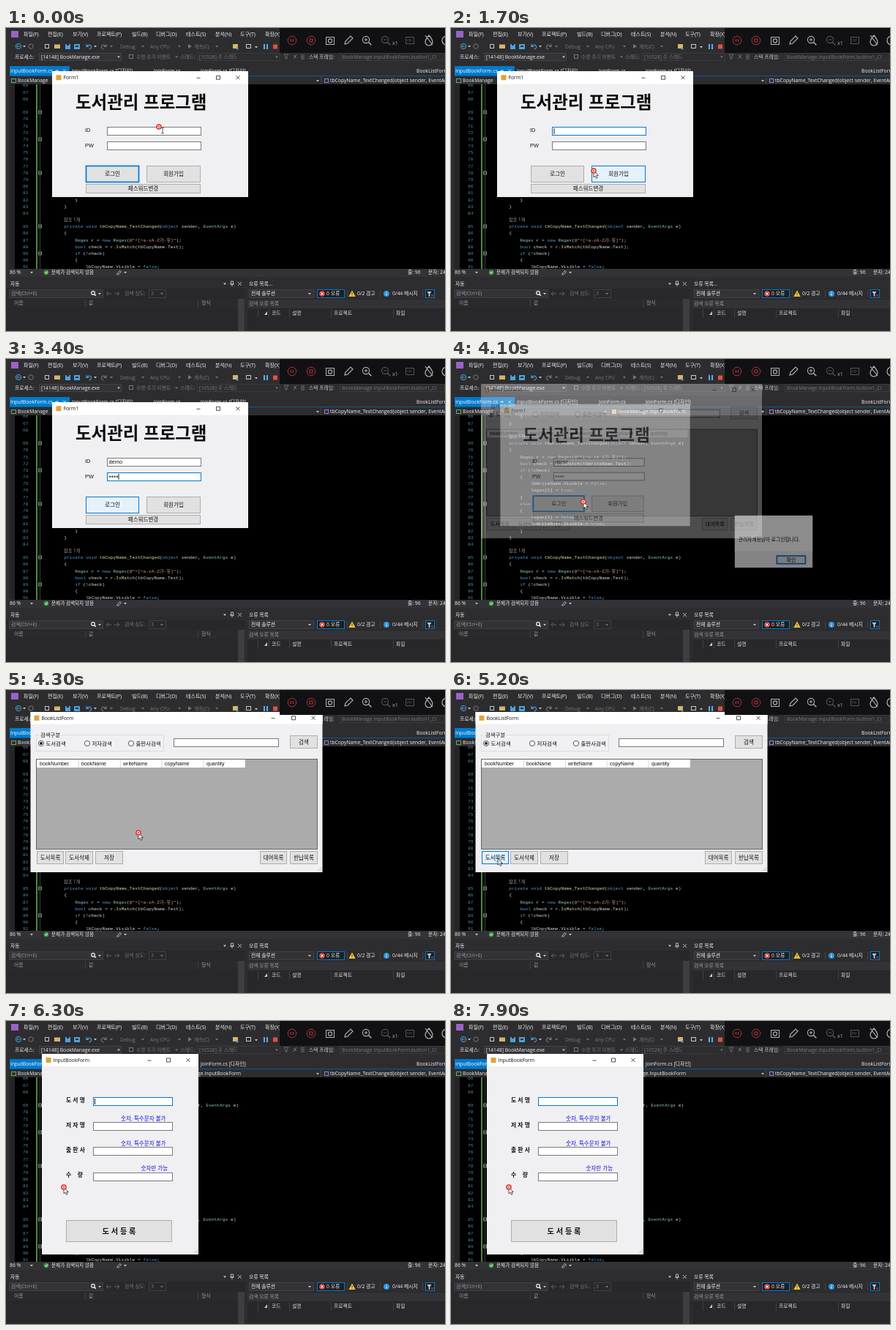
Animation of 600 by 414 pixels, one loop 8000 ms. Source, as an HTML page:

```html
<!DOCTYPE html>
<html lang="ko">
<head>
<meta charset="utf-8">
<title>도서관리 프로그램</title>
<style>
html, body { margin: 0; width: 100%; height: 100%; overflow: hidden; background: #2d2d30; }
svg { display: block; width: 100%; height: 100%; }
text { font-family: "Open Sans", "Noto Sans CJK KR", "Noto Sans CJK", sans-serif; white-space: pre; }
.form text { font-family: "Liberation Sans", "Noto Sans CJK KR", "Noto Sans CJK", sans-serif; }
text.code { font-family: "Liberation Mono", "Noto Sans CJK KR", "Noto Sans CJK", monospace; }
</style>
</head>
<body>
<svg id="stage" viewBox="0 0 600 414"></svg>
<script>
const LOOP = 8000, TICK = 100;
const stage = document.getElementById('stage');

function add(parent, tag, attrs = {}) {
  const node = document.createElementNS('http://www.w3.org/2000/svg', tag);
  set(node, attrs);
  parent.appendChild(node);
  return node;
}
function set(node, attrs) {
  for (const k in attrs) node.setAttribute(k, attrs[k]);
}
// Edges are given as left, top, right, bottom.
function box(p, x, y, r, b, fill, stroke) {
  const o = stroke ? .5 : 0;
  return add(p, 'rect', { x: x + o, y: y + o, width: r - x - 2 * o, height: b - y - 2 * o,
    fill, stroke: stroke || 'none' });
}
// y is the vertical middle of the text.
function label(p, x, y, str, fill = '#f1f1f1', size = 6.8, extra = {}) {
  const t = add(p, 'text', { x, y: y + size * .36, fill, 'font-size': size, ...extra });
  t.textContent = str;
  return t;
}
const line = (p, d, stroke, w = 1, fill = 'none') =>
  add(p, 'path', { d, stroke, 'stroke-width': w, fill });
const dot = (p, cx, cy, r, fill, stroke = 'none', w = 1) =>
  add(p, 'circle', { cx, cy, r, fill, stroke, 'stroke-width': w });
const drop = (p, x, y, c = '#c8c8c8') =>
  add(p, 'path', { d: `M${x - 2} ${y - 1}h4l-2 2.4z`, fill: c });
const lens = (p, x, y, r, c, w = 1) => {
  dot(p, x, y, r, 'none', c, w);
  line(p, `M${x + r * .7} ${y + r * .7}l${r * .9} ${r * .9}`, c, w * 1.3);
};

/* ---------- editor ---------- */
const DIM = '#77777b', GREY = '#c8c8c8', BAR = '#2d2d30';

function menuAndTools(p) {
  box(p, 0, 0, 600, 67, BAR);
  box(p, 7, 4, 17, 13, '#9a63c8');
  [['파일(F)', 24], ['편집(E)', 57], ['보기(V)', 91], ['프로젝트(P)', 124], ['빌드(B)', 172],
   ['디버그(D)', 205], ['테스트(S)', 246], ['분석(N)', 286], ['도구(T)', 320], ['확장(X)', 354]]
    .forEach(([s, x]) => label(p, x, 8.9, s, '#f1f1f1', 7));

  dot(p, 17, 25, 3.6, 'none', '#4aa3e0');
  line(p, 'M19 25h-4m1.6 -1.6l-1.6 1.6l1.6 1.6', '#4aa3e0', .9);
  drop(p, 25, 25);
  dot(p, 34, 25, 3.2, 'none', DIM);
  box(p, 53, 22, 59, 28, 'none', GREY);
  box(p, 66, 22.5, 74, 28, '#d8b46a');
  box(p, 81, 22, 88, 29, '#4aa3e0');
  box(p, 83, 22, 86, 24, BAR);
  box(p, 93, 22, 101, 29, '#4aa3e0');
  box(p, 95, 24, 99, 26, BAR);
  line(p, 'M110 22v3.4h3.4M110.4 25q4 -4 6 0q1 3 -3 4', '#4aa3e0', 1.1);
  drop(p, 122, 25);
  line(p, 'M137 22v3.4h-3.4M136.6 25q-4 -4 -6 0q-1 3 3 4', DIM, 1.1);
  drop(p, 144, 25, DIM);
  label(p, 156, 25.4, 'Debug', DIM);
  drop(p, 187, 25, DIM);
  label(p, 197, 25.4, 'Any CPU', DIM);
  drop(p, 237, 25, DIM);
  add(p, 'path', { d: 'M249 22l5 3l-5 3z', fill: DIM });
  label(p, 257, 25.4, '계속(C)', DIM);
  drop(p, 288, 25, DIM);
  box(p, 310, 22, 317, 28, '#d8b46a');
  dot(p, 316, 28, 1.6, '#4aa3e0');
  box(p, 328, 22, 335, 28, 'none', GREY);
  drop(p, 342, 26);
  box(p, 352, 22, 354, 29, '#5ab0ee');
  box(p, 356, 22, 358, 29, '#5ab0ee');
  box(p, 365, 22.5, 371, 28.5, '#e0523e');

  label(p, 12, 39.5, '프로세스:');
  box(p, 45, 34, 158, 45, '#333337', '#434346');
  label(p, 48, 39.5, '[14148] BookManage.exe');
  drop(p, 154, 39.5);
  box(p, 168, 36, 174, 42, 'none', DIM);
  label(p, 178, 39.5, '수명 주기 이벤트', DIM);
  drop(p, 233, 39.5, DIM);
  label(p, 238, 39.5, '스레드:', DIM);
  box(p, 261, 34, 375, 45, 'none', '#3a3a3e');
  label(p, 264, 39.5, '[10528] 주 스레드', DIM);
  drop(p, 370, 39.5, DIM);
  line(p, 'M380 36h6l-2 3v3h-2v-3z', DIM, .8);
  line(p, 'M393 42l4 -6M393 37l4 4', DIM, 1);
  line(p, 'M403 37h5m-5 2.5h5m-5 2.5h5', DIM, 1);
  label(p, 414, 39.5, '스택 프레임:', GREY);
  box(p, 456, 34, 600, 45, 'none', '#3a3a3e');
  label(p, 459, 39.5, 'BookManage.InputBookForm.button1_Cl', DIM);

  box(p, 5, 52, 87, 65, '#007acc');
  label(p, 6, 58.6, 'InputBookForm.cs', '#fff');
  line(p, 'M67 58.6h5m-2 -2v4M78 56.6l4 4m0 -4l-4 4', '#d0e6f5', .9);
  label(p, 90, 58.6, 'InputBookForm.cs [디자인]');
  label(p, 202, 58.6, 'JoinForm.cs');
  label(p, 266, 58.6, 'JoinForm.cs [디자인]');
  label(p, 561, 58.6, 'BookListForm.cs');
  box(p, 5, 65, 600, 66, '#0a588e');
}

function recorder(p) {
  box(p, 374, 0, 600, 34, '#111114');
  const red = '#b8383c', ink = '#b4b4b8', off = '#55555a';
  for (const x of [391, 417]) dot(p, x, 17, 5.8, 'none', red, .9);
  line(p, 'M389.5 15v4M392.5 15v4', red, 1.1);
  box(p, 414.5, 14.5, 419.5, 19.5, 'none', red);
  box(p, 437, 12, 449, 23, 'none', ink);
  dot(p, 443, 17.5, 2.6, 'none', ink, 1.1);
  line(p, 'M463 22l1 -4l7 -7l3 3l-7 7z', ink, 1.1);
  for (const [x, c] of [[492, ink], [518, off]]) {
    lens(p, x, 16, 4.6, c, 1.1);
    line(p, `M${x - 2.2} 16h4.4`, c);
  }
  line(p, 'M492 13.8v4.4', ink);
  label(p, 528, 20.5, 'x1', ink, 7);
  box(p, 546, 12, 558, 22, 'none', off);
  label(p, 548, 17, 'PIP', off, 4.6);
  line(p, 'M578 10q5 6 5 9a5 5 0 0 1 -10 0q0 -3 5 -9zM573 10l10 13', ink, 1.2);
  dot(p, 602, 17, 6, 'none', ink, 1.2);
}

const COLORS = [
  [/^(private|void|object|new|bool|if|else|true|false)$/, '#569cd6'],
  [/^(Regex|EventArgs)$/, '#8cc8bc'],
  [/^@?"/, '#d69d85'],
  [/_TextChanged$|^IsMatch$/, '#dcdcaa']
];
// Each method has an extra row above it for its reference count.
const ROW = 9.18, METHODS = [69, 85], CODE_SIZE = 6.22;
const rowY = n => 271 + (n - 85 - METHODS.filter(m => n < m).length) * ROW;

function codeLine(p, n, col, str) {
  const t = label(p, 49.4 + col * 3.73, rowY(n), '', '#dcdcdc', CODE_SIZE, { class: 'code' });
  for (const part of str.match(/@?"[^"]*"|\w+|\s+|[^\w\s"]/g)) {
    const hit = COLORS.find(([re]) => re.test(part));
    const s = add(t, 'tspan', hit ? { fill: hit[1] } : {});
    s.textContent = part;
  }
}

function codeBlock(p, n, name) {
  label(p, 79, rowY(n) - ROW, '참조 1개', '#a0a0a0', 6.2);
  [[8, `private void tb${name}_TextChanged(object sender, EventArgs e)`], [8, '{'],
   [12, 'Regex r = new Regex(@"^[^a-zA-Z가-힣]");'],
   [12, `bool check = r.IsMatch(tb${name}.Text);`], [12, 'if (!check)'], [12, '{'],
   [16, `lb${name}.Visible = false;`], [16, 'login[1] = true;'], [12, '}'], [12, 'else'], [12, '{'],
   [16, 'login[1] = false;'], [16, `lb${name}.Visible = true;`], [12, '}'], [8, '}']]
    .slice(0, 92 - n).forEach(([col, s], i) => codeLine(p, n + i, col, s));
}

function editor(p) {
  box(p, 5, 66, 600, 77, BAR);
  box(p, 7, 69, 14, 75, 'none', '#69a869');
  label(p, 16, 72, 'BookManage');
  line(p, 'M215.5 67v10M430.5 67v10', '#434346');
  drop(p, 211, 72); drop(p, 426, 72);
  box(p, 220, 69, 226, 75, '#d8a868');
  label(p, 228, 72, 'BookManage.InputBookForm');
  box(p, 435, 69, 441, 75, 'none', '#9b7fd0');
  label(p, 443, 72, 'tbCopyName_TextChanged(object sender, EventArgs e)');

  box(p, 5, 77, 600, 329, '#000');
  box(p, 5, 77, 12, 329, '#252528');
  box(p, 41, 77, 43, 329, '#4f8a3a');
  line(p, 'M46.5 77V329', '#5a5a5a', .7);
  for (const n of [69, 73, 78, 85, 89]) {
    const y = Math.round(rowY(n));
    box(p, 44, y - 2.5, 49, y + 2.5, '#000', '#8a8a8a');
    line(p, `M45.4 ${y}h2.2`, '#c0c0c0', .8);
  }
  for (let n = 66; n < 92; n++)
    label(p, 23, rowY(n), n, '#4a8ea6', CODE_SIZE, { class: 'code' });
  codeLine(p, 66, 12, '}');
  codeLine(p, 67, 8, '}');
  codeBlock(p, METHODS[0], 'WriteName');
  codeBlock(p, METHODS[1], 'CopyName');

  box(p, 0, 329, 600, 414, BAR);
  box(p, 5, 329, 600, 340, '#333337');
  label(p, 5, 334, '86 %');
  drop(p, 35, 334);
  dot(p, 55, 334, 3.2, '#3fa04a');
  line(p, 'M53.4 334l1.3 1.4l2.2 -2.8', '#fff', .9);
  label(p, 62, 334, '문제가 검색되지 않음', '#f1f1f1', 6.6);
  line(p, 'M151.5 336.5l4 -5l2 1.6l-4 4z', GREY, .9);
  drop(p, 163, 334);
  label(p, 549, 334, '줄: 96');
  label(p, 577, 334, '문자: 24');
}

let errorTitle;
function panels(p) {
  const back = '#28272a';
  box(p, 0, 343, 327, 414, back);
  box(p, 0, 343, 327, 356, BAR);
  label(p, 6, 349.5, '자동');
  drop(p, 299, 349.5);
  line(p, 'M307.5 346h3v4h-3zM306 350h6M309 350v3M317 347l5 5m0 -5l-5 5', GREY, .9);
  box(p, 4, 357, 133, 369, '#333337', '#3f3f46');
  label(p, 7, 363, '검색(Ctrl+E)', '#9a9a9a');
  lens(p, 119, 362, 2.3, '#f1f1f1', 1.2);
  drop(p, 128, 363);
  line(p, 'M144 363h-7m3 -3l-3 3l3 3M148 363h7m-3 -3l3 3l-3 3', '#606064', 1);
  label(p, 162, 363, '검색 심도:', DIM);
  box(p, 195, 357, 219, 369, 'none', '#3f3f46');
  label(p, 198, 363, '3', DIM);
  drop(p, 213, 363, DIM);
  box(p, 0, 370, 327, 382, '#2a2a2c');
  box(p, 317, 370, 326, 414, '#3e3e42');
  [['이름', 11], ['값', 113], ['형식', 267]].forEach(([s, x]) => label(p, x, 376, s, '#9a9a9a'));
  line(p, 'M108.5 371v10M262.5 371v10', '#3f3f46');

  box(p, 330, 343, 600, 414, back);
  box(p, 330, 343, 600, 370, BAR);
  errorTitle = label(p, 332, 349.5, '오류 목록...');
  box(p, 332, 357, 421, 369, '#333337', '#434346');
  label(p, 335, 363, '전체 솔루션');
  drop(p, 415, 363);
  box(p, 425, 357, 463, 369, '#1f1f22', '#007acc');
  dot(p, 432, 363, 3.8, '#e04a3f');
  line(p, 'M430.4 361.4l3.2 3.2m0 -3.2l-3.2 3.2', '#fff', 1);
  label(p, 438, 363, '0 오류');
  add(p, 'path', { d: 'M473 358.5l4.6 8.5h-9.2z', fill: '#f5c93a' });
  line(p, 'M473 361.5v2.6m0 .8v1', '#222', .9);
  label(p, 480, 363, '0/2 경고');
  line(p, 'M466.5 358v10M511.5 358v10M569.5 358v10', '#434346');
  dot(p, 520, 363, 4, '#2a97dc');
  line(p, 'M520 360.5v1m0 1v3', '#fff', 1);
  label(p, 528, 363, '0/44 메시지');
  box(p, 573, 357, 586, 369, '#1f1f22', '#007acc');
  line(p, 'M576 360.5h5l-2 2.5v3.5h-1v-3.5z', GREY, .8, GREY);
  line(p, 'M581 364l3 3m0 -3l-3 3', '#e04a3f', .9);
  box(p, 330, 371, 600, 383, '#333337');
  label(p, 332, 377, '검색 오류 목록', '#9a9a9a');
  [['코드', 363], ['설명', 391], ['프로젝트', 448], ['파일', 533]]
    .forEach(([s, x]) => label(p, x, 390, s, '#e0e0e0'));
  line(p, 'M344.5 384v12M359.5 384v12M387.5 384v12M444.5 384v12M529.5 384v12', '#3f3f46');
  add(p, 'path', { d: 'M353 392l4 -5v5z', fill: GREY });
}

/* ---------- forms ---------- */
const BLUE = '#0078d7', FACE = '#f0eff2';

function makeForm(x, y, r, b, barH, title, icon, controls) {
  const g = add(stage, 'g', { class: 'form' });
  box(g, x, y, r, b, FACE);
  box(g, x, y, r, y + barH, '#fff');
  const mid = y + barH / 2;
  if (icon) {
    const [mn, mx, cl] = controls;
    box(g, icon, mid - 3.5, icon + 7, mid + 3.5, '#e0a23c');
    label(g, icon + 10, mid, title, '#111', 6.8, { style: 'font-family:"Open Sans",sans-serif' });
    line(g, `M${mn - 2.5} ${mid + .5}h5`, '#222', .8);
    line(g, `M${mx - 2.5} ${mid - 2.5}h5v5h-5z`, '#222', .8);
    line(g, `M${cl - 2.5} ${mid - 2.5}l5 5m0 -5l-5 5`, '#222', .8);
  }
  const cx = (x + r) / 2, cy = (y + b) / 2;
  return {
    g,
    show(a) {
      const s = 1 - .055 * (1 - a);
      set(g, { opacity: a, visibility: a ? 'visible' : 'hidden',
        transform: `translate(${cx} ${cy}) scale(${s}) translate(${-cx} ${-cy})` });
    }
  };
}

const LOOKS = {
  plain: { fill: '#e1e1e1', stroke: '#adadad', 'stroke-width': 1 },
  focus: { fill: '#e1e1e1', stroke: BLUE, 'stroke-width': 1.7 },
  hover: { fill: '#e5f1fb', stroke: BLUE, 'stroke-width': 1 },
  down: { fill: '#cce4f7', stroke: '#005499', 'stroke-width': 1 }
};
function button(g, x, y, r, b, str, size = 7.5, extra = {}) {
  const face = box(g, x, y, r, b, '#e1e1e1', '#adadad');
  label(g, (x + r) / 2, (y + b) / 2, str, '#111', size, { 'text-anchor': 'middle', ...extra });
  return look => set(face, LOOKS[look]);
}
function field(g, x, y, r, b) {
  const frame = box(g, x, y, r, b, '#fff', '#7a7a7a');
  return on => set(frame, { stroke: on ? BLUE : '#7a7a7a' });
}
const caretLine = g => line(g, '', '#000', .9);
const placeCaret = (c, x, y, on) => set(c, { d: on ? `M${x} ${y - 4}v8` : 'M0 0' });
function grip(g, x, y) {
  for (const [i, j] of [[0, 0], [2, 0], [2, -2], [4, 0], [4, -2], [4, -4]])
    box(g, x + i - 6, y + j - 3, x + i - 5, y + j - 2, '#b0b0b0');
}

menuAndTools(stage);
editor(stage);
panels(stage);

const list = makeForm(33.5, 30, 432.5, 249, 16.5, 'BookListForm', 38.5, [365, 393, 420]);
box(list.g, 41, 61, 216, 84, 'none', '#dcdcdc');
box(list.g, 45, 58, 76, 65, FACE);
label(list.g, 47, 61.5, '검색구분', '#111', 7.4);
[['도서검색', 48], ['저자검색', 111], ['출판사검색', 171]].forEach(([s, x], i) => {
  dot(list.g, x, 73, 3.6, '#fff', '#444', .9);
  if (!i) dot(list.g, x, 73, 2, '#222');
  label(list.g, x + 6.5, 73, s, '#111', 7.4);
});
field(list.g, 229, 66, 373, 78);
button(list.g, 388, 62, 426, 80, '검색');
box(list.g, 41, 94, 426, 218, '#ababab', '#646464');
box(list.g, 42, 95, 327, 106, '#fff');
['bookNumber', 'bookName', 'writeName', 'copyName', 'quantity'].forEach((s, i) => {
  label(list.g, 46 + i * 57, 100.5, s, '#111', 7);
  line(list.g, `M${99.5 + i * 56.8} 95v11`, '#d8d8d8');
});
const bookButton = button(list.g, 42, 220, 79, 238, '도서목록');
button(list.g, 81, 220, 119, 238, '도서삭제');
button(list.g, 122, 220, 160, 238, '저장');
button(list.g, 347, 220, 384, 238, '대여목록');
button(list.g, 388, 220, 426, 238, '반납목록');
grip(list.g, 432, 249);

const login = makeForm(63, 59, 331, 231, 17.5, 'Form1', 68.5, [263, 290, 317]);
label(login.g, 95, 102, '도서관리 프로그램', '#0a0a0a', 23.5, { 'font-weight': 700 });
label(login.g, 108, 139.5, 'ID', '#111', 7.4);
label(login.g, 108, 160.5, 'PW', '#111', 7.4);
const idField = field(login.g, 138, 135, 267, 147);
const pwField = field(login.g, 138, 155, 267, 167);
const idText = label(login.g, 140.5, 140.2, '', '#111', 7.4);
const pwText = label(login.g, 140.5, 162, '', '#111', 8.4);
const loginCaret = caretLine(login.g);
const loginButton = button(login.g, 109, 188, 182, 211, '로그인');
const joinButton = button(login.g, 192, 188, 266, 211, '회원가입');
button(login.g, 109, 213, 266, 226, '패스워드변경');

const message = makeForm(386.5, 213, 495.5, 286, 50, '', 0);
label(message.g, 391.5, 246, '관리자계정님이 로그인합니다.', '#111', 6.9);
button(message.g, 445, 269, 486, 281, '확인', 7)('focus');

const input = makeForm(49, 45, 263, 319, 17, 'InputBookForm', 54.5, [196, 222, 249]);
['도 서 명', '저 자 명', '출 판 사', '수    량'].forEach((s, i) => {
  const y = 104 + i * 34.2;
  label(input.g, 82, y + 4, s, '#111', 7.8, { 'font-weight': 700 });
  field(input.g, 119, Math.round(y), 228, Math.round(y) + 12)(!i);
  if (i) label(input.g, i < 3 ? 157 : 184.5, y - 5, i < 3 ? '숫자, 특수문자 불가' : '숫자만 가능', '#1010e0', 7.5);
});
const inputCaret = caretLine(input.g);
button(input.g, 82, 272, 227, 302, '도 서 등 록', 10.2, { 'font-weight': 700 });
grip(input.g, 263, 319);

recorder(stage);

/* ---------- pointer ---------- */
const pointer = add(stage, 'g');
const arrow = line(pointer, 'M0 0v9l2 -1.8l1.5 3.1l1.6 -.8l-1.4 -2.9h2.6z', '#111', .7, '#fff');
const beam = line(pointer, 'M-2 -4h1.5l.5 .5l.5 -.5h1.5M0 -3.5v7M-2 4h1.5l.5 -.5l.5 .5h1.5', '#222', .8);
const mark = add(pointer, 'g');
dot(mark, 0, 0, 3.1, '#fbd9d6', '#e0322c', 1.5);
line(mark, 'M-1.2 -1.2l2.4 2.4m0 -2.4l-2.4 2.4', '#e0322c', .8);
const busy = dot(pointer, 0, 0, 4.4, 'none', '#3aa0e8', 2);

/* ---------- timeline ---------- */
function track(keys, t) {
  const i = keys.findIndex(k => k[0] > t);
  if (i < 0) return keys[keys.length - 1].slice(1);
  if (!i) return keys[0].slice(1);
  const a = keys[i - 1], b = keys[i], u = (t - a[0]) / (b[0] - a[0]);
  return a.slice(1).map((v, k) => v + (b[k + 1] - v) * u);
}
const FADES = [
  [login, [[4000, 1], [4100, .41], [4200, .06], [4300, 0]]],
  [list, [[4000, 0], [4100, .32], [4200, .85], [4300, 1], [5200, 1], [5300, .45], [5400, .04], [5500, 0]]],
  [message, [[3500, 0], [3600, .45], [3700, 1], [4000, 1], [4100, .55], [4200, .12], [4300, 0]]],
  [input, [[5200, 0], [5300, .3], [5400, .82], [5500, 1]]]
];
const PATH = [[0, 214, 140], [800, 214, 141], [1000, 213, 150], [1300, 207, 176], [1600, 196, 195],
  [1700, 195, 195], [1900, 181, 195], [4300, 181, 195], [4600, 150, 206], [4900, 88, 226],
  [5100, 64, 230], [5600, 64, 230], [6000, 79, 227]];
const ID_KEYS = [2000, 2100, 2200, 2400], PW_KEYS = [2800, 2900, 3100, 3200];
const typed = (keys, t) => keys.filter(k => k <= t).length;
const blink = (t, from, half = 530) => t >= from && Math.floor((t - from) / half) % 2 === 0;
const within = (t, a, b) => t >= a && t < b;

function draw(t) {
  for (const [form, keys] of FADES) form.show(track(keys, t)[0]);
  errorTitle.textContent = t < 2000 ? '오류 목록...' : '오류 목록';

  const inId = within(t, 200, 2600), inPw = within(t, 2600, 3500);
  const ids = typed(ID_KEYS, t), stars = typed(PW_KEYS, t);
  idField(inId);
  pwField(inPw);
  idText.textContent = 'demo'.slice(0, ids);
  pwText.textContent = '*'.repeat(stars);
  const last = [200, ...ID_KEYS, 2600, ...PW_KEYS].filter(k => k <= t).pop();
  const cx = inId ? 141 + (ids && idText.getComputedTextLength())
    : 141 + (stars && pwText.getComputedTextLength());
  placeCaret(loginCaret, cx, inId ? 141 : 161, (inId || inPw) && blink(t, last));
  loginButton(within(t, 200, 1900) ? 'plain' : within(t, 1900, 3500) ? 'hover' : t === 3500 ? 'down' : 'focus');
  joinButton(within(t, 1500, 1800) ? 'hover' : 'plain');
  bookButton(within(t, 5000, 5500) ? 'hover' : 'plain');
  placeCaret(inputCaret, 121.5, 110, blink(t, 5250, 515));

  const [x, y] = track(PATH, t);
  const text = t < 1000, wait = within(t, 5200, 5700);
  const hidden = within(t, 2000, 3500);
  set(pointer, { transform: `translate(${x} ${y})`, visibility: hidden ? 'hidden' : 'visible' });
  set(arrow, { opacity: text ? 0 : 1 });
  set(beam, { opacity: text ? 1 : 0 });
  set(mark, { opacity: wait ? 0 : 1, transform: text ? 'translate(-5 -5)' : 'translate(0 0)' });
  set(busy, { opacity: !wait ? 0 : t < 5300 ? .4 : .9 });
}

function tick() {
  draw(Math.floor(performance.now() % LOOP / TICK) * TICK);
  requestAnimationFrame(tick);
}
tick();
</script>
</body>
</html>
```
